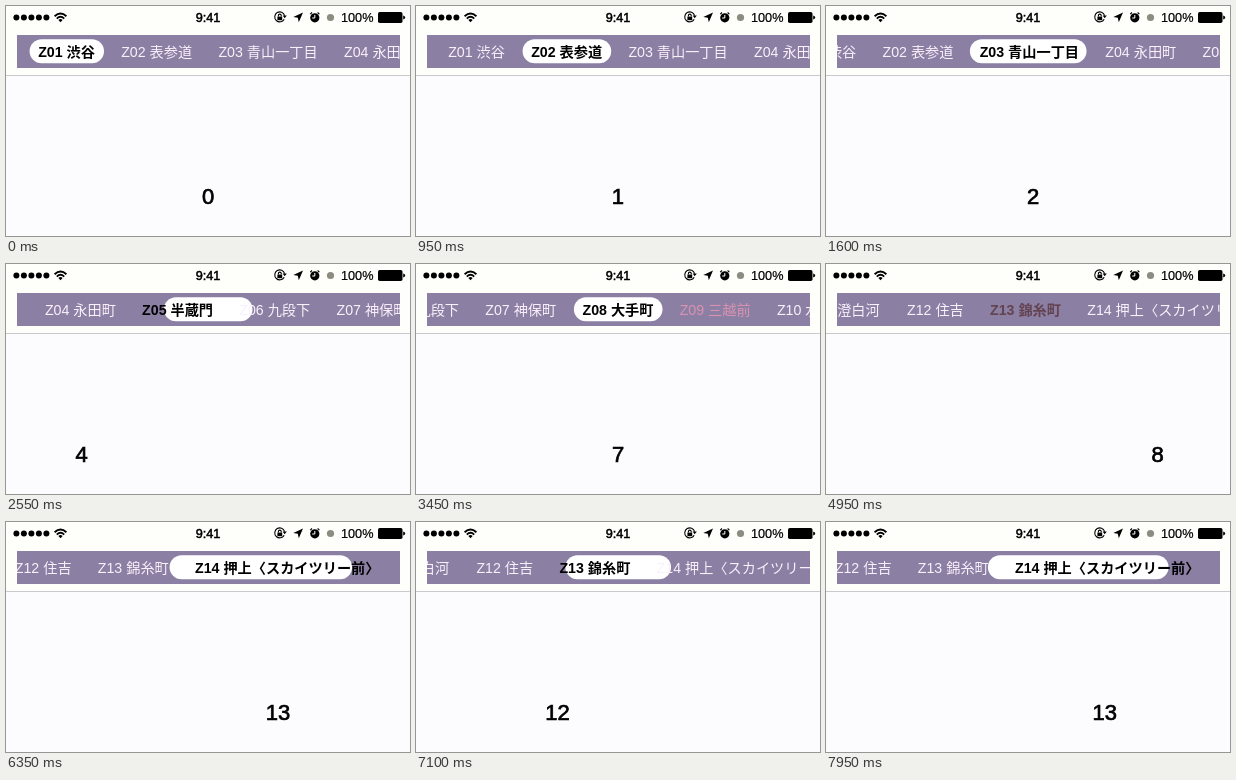
An HTML page that plays this animation: 404 px wide and 230 px high, repeating every 8000 ms.

```html
<!DOCTYPE html>
<html lang="ja">
<head>
<meta charset="utf-8">
<title>Tab pager</title>
<style>
html, body { margin: 0; width: 100%; height: 100%; overflow: hidden; background: #fcfcfe; }
svg { display: block; width: 100vw; height: 100vh; }
text { font-family: "Liberation Sans", "Noto Sans CJK JP", "Noto Sans CJK", sans-serif; white-space: pre; }
.status { font-size: 12.7px; stroke: #000; stroke-width: .2; }
.tab { font-size: 14.2px; }
.page { font-size: 22px; text-anchor: middle; stroke: #000; stroke-width: .7; }
</style>
</head>
<body>
<svg viewBox="0 0 404 230">
  <defs><clipPath id="clip"><rect x="11" y="29" width="383" height="33"/></clipPath></defs>
  <rect width="404" height="230" fill="#fcfcfe"/>
  <g id="pages"></g>
  <rect width="404" height="69" fill="#fefefa"/>
  <rect y="69" width="404" height="1" fill="#cacace"/>
  <g id="dots"></g>
  <g fill="none" stroke="#000" stroke-width="1.9">
    <path d="M48.6 10.2Q54.5 4.6 60.4 10.2M50.8 12.6Q54.5 9 58.2 12.6"/>
    <path d="M52.4 13.9Q54.5 12.3 56.6 13.9L54.5 16.2Z" fill="#000" stroke="none"/>
  </g>
  <text class="status" x="202" y="16" text-anchor="middle" style="stroke-width:.5">9:41</text>
  <g fill="none" stroke="#000" stroke-width="1.1">
    <path d="M278.2 13.2A5 5 0 1 1 278.6 9.6"/>
    <path d="M276.6 9.4h4.2l-2.1 2.8z" fill="#000" stroke="none"/>
    <rect x="271.4" y="10.6" width="4.8" height="3.6" fill="#000" stroke="none"/>
    <path d="M272.4 10.6V9.5a1.4 1.4 0 0 1 2.8 0v1.1"/>
  </g>
  <path d="M297 6.5L292.8 16.2L291.8 11.8L287.3 10.9Z"/>
  <g>
    <circle cx="308.8" cy="11.8" r="4.6"/>
    <path d="M304.2 8.2l1.8-1.7M313.4 8.2l-1.8-1.7" stroke="#000" stroke-width="1.1"/>
    <path d="M308.8 9v3h-2.6" fill="none" stroke="#fff"/>
  </g>
  <circle cx="324.5" cy="11.5" r="3.6" fill="#8c8c80"/>
  <text class="status" x="335" y="16">100%</text>
  <rect x="372" y="6" width="24.5" height="11" rx="1.8"/>
  <path d="M397.2 9.6q2 .4 2 1.9t-2 1.9z"/>
  <rect x="11" y="29" width="383" height="33" fill="#8b7fa4"/>
  <g clip-path="url(#clip)"><g id="strip">
    <rect id="pill" y="33.3" height="24" rx="12" fill="#fff"/>
  </g></g>
</svg>
<script>
const LOOP = 8000, WIDTH = 404, MID = 202, MAX_SCROLL = 1135.2;
const SIZE = 14.2, GAP = 26.2;
const LIGHT = [250, 240, 250], PINK = [218, 146, 176], BLACK = [0, 0, 0];
const DRAG = 3450, TOUCH = 4780, TAP = 4870, TAP_END = 5220;
const stations = ['渋谷', '表参道', '青山一丁目', '永田町', '半蔵門', '九段下', '神保町',
  '大手町', '三越前', '水天宮前', '清澄白河', '住吉', '錦糸町', '押上〈スカイツリー前〉'];

const $ = id => document.getElementById(id);
function add(parent, tag, attrs, text = '') {
  const el = document.createElementNS('http://www.w3.org/2000/svg', tag);
  for (const k in attrs) el.setAttribute(k, attrs[k]);
  el.textContent = text;
  return parent.appendChild(el);
}

for (let i = 0; i < 5; i++) add($('dots'), 'circle', { cx: 10.4 + i * 7.5, cy: 11.5, r: 3 });

let nextX = 32.2;
const tabs = stations.map((name, i) => {
  const x = nextX, w = SIZE * (name.length + 2);
  nextX += w + GAP;
  const label = add($('strip'), 'text', { class: 'tab', x, y: 50.5 }, `Z${String(i + 1).padStart(2, '0')} ${name}`);
  const page = add($('pages'), 'text', { class: 'page', y: 198 }, i);
  return { x, w, label, page };
});

const lerp = (a, b, u) => a + (b - a) * u;
const clamp = (v, lo, hi) => Math.min(hi, Math.max(lo, v));
const smooth = u => u * u * (3 - 2 * u);
const flick = u => 1 - (1 - smooth(u)) ** 2;
const progress = (t, a, b) => clamp((t - a) / (b - a), 0, 1);
const rgb = c => `rgb(${c.map(Math.round)})`;
const mix = (a, b, u) => a.map((v, i) => lerp(v, b[i], u));

// start, end, target page, easing
const moves = [
  [100, 850, 1, flick], [950, 1773, 2, flick], [1773, 2130, 3, flick], [2130, 2459, 4, flick],
  [2459, 2809, 5, flick], [2809, 3130, 6, flick], [3130, 3430, 7, flick],
  [TAP, TAP_END, 12, smooth], [5300, 5950, 13, flick],
  [6150, 6350, 12.827, smooth], [6350, 6950, 12.15, smooth], [7200, 7950, 12.81, smooth]
];

function pageAt(t) {
  let p = 0;
  for (const [a, b, target, ease] of moves) {
    if (t < a) break;
    p = lerp(p, target, ease(progress(t, a, b)));
  }
  return p;
}

function pillAt(p) {
  const i = Math.min(Math.floor(p), tabs.length - 2), a = tabs[i], b = tabs[i + 1];
  const x = lerp(a.x, b.x, p - i), w = lerp(a.w, b.w, p - i);
  return { x: x - 8.6, w: w + 17.6, mid: x + w / 2 };
}

const centred = mid => clamp(mid - MID, 0, MAX_SCROLL);

function scrollAt(t, pill) {
  if (t < DRAG || t >= TAP_END) return centred(pill.mid);
  const dragged = lerp(centred(pillAt(7).mid), 1063, flick(progress(t, DRAG + 50, 4720)));
  return lerp(dragged, centred(pillAt(12).mid), smooth(progress(t, TAP + 60, TAP_END)));
}

function colourAt(i, t, current) {
  if (i === 12 && t >= TAP && t < TAP_END) return mix(PINK, BLACK, progress(t, TAP, 5020));
  if (i === current) return BLACK;
  const touched = (i === 8 && t >= DRAG - 10 && t < 3600) || (i === 12 && t >= TOUCH && t < TAP);
  return touched ? PINK : LIGHT;
}

function draw(t) {
  const p = pageAt(t), pill = pillAt(p);
  const current = t >= TAP && t < TAP_END ? 12 : Math.round(p);
  $('strip').setAttribute('transform', `translate(${-scrollAt(t, pill)} 0)`);
  $('pill').setAttribute('x', pill.x);
  $('pill').setAttribute('width', pill.w);
  tabs.forEach(({ label, page }, i) => {
    label.setAttribute('fill', rgb(colourAt(i, t, current)));
    label.setAttribute('font-weight', i === current ? 700 : 400);
    page.setAttribute('x', MID + (i - p) * WIDTH);
  });
}

const start = performance.now();
function tick() {
  draw((performance.now() - start) % LOOP);
  requestAnimationFrame(tick);
}
tick();
</script>
</body>
</html>
```
